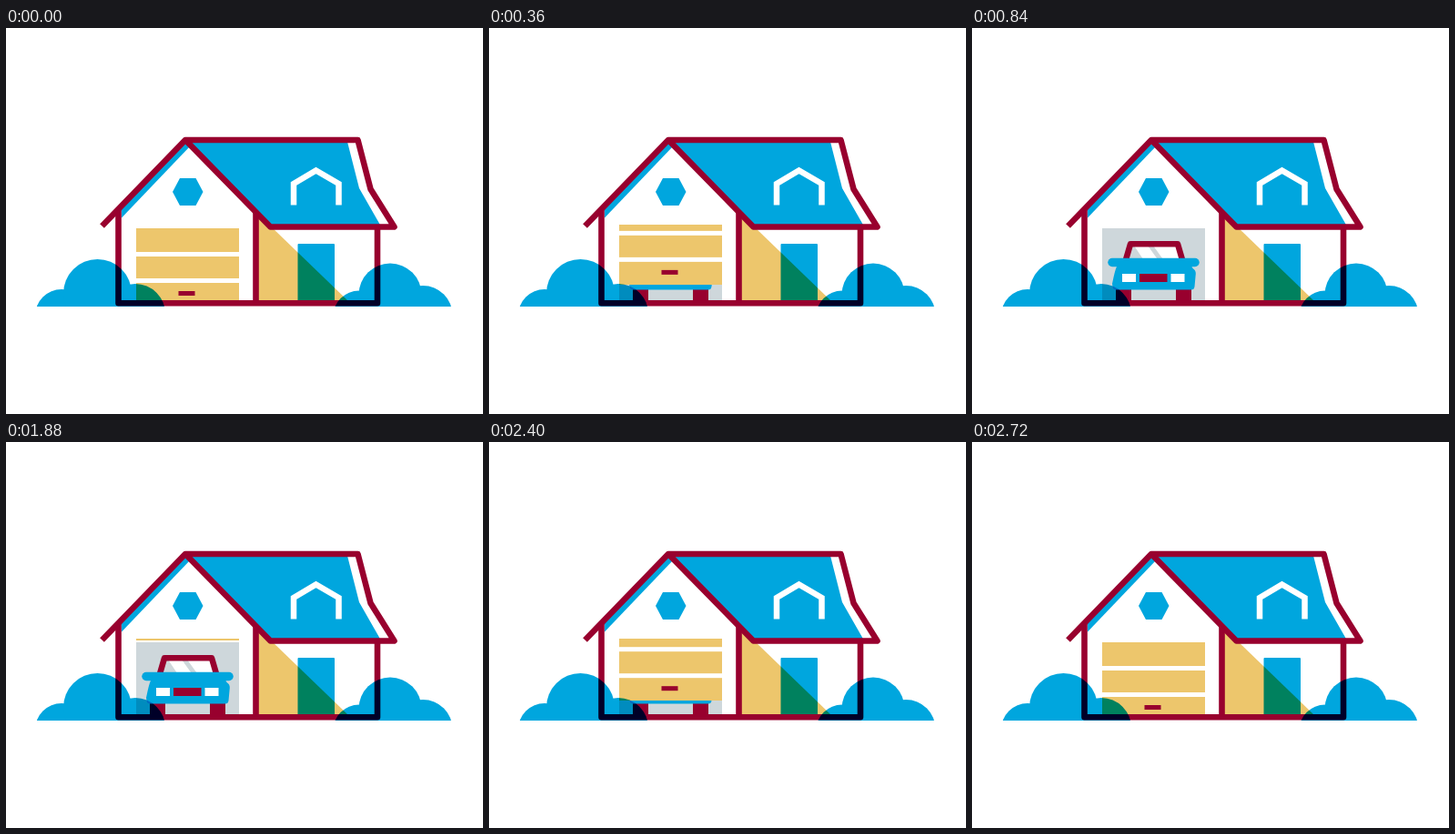
An HTML page that plays this animation: 524 px wide and 424 px high, repeating every 3.6 s.

```html
<!DOCTYPE html>
<html lang="en">
<head>
<meta charset="utf-8">
<title>Garage door</title>
<style>
  :root { --blue: #00a6de; --red: #98002e; --sand: #edc66c; --grey: #ced7db; }
  html, body { margin: 0; width: 100%; height: 100%; overflow: hidden; background: #fff; }
  svg { display: block; width: 524px; height: 424px; background: #fff; }
  .blue { fill: var(--blue); }
  .red { fill: var(--red); }
  .sand { fill: var(--sand); }
  .grey { fill: var(--grey); }
  .white { fill: #fff; }
  .line { fill: none; stroke: var(--red); stroke-width: 6.6; stroke-linejoin: round; }
  .mix { mix-blend-mode: multiply; }

  .door { animation: lift 3600ms infinite; }

  /* Speeds up, then runs evenly; closes the other way round. */
  @keyframes lift {
    0% { transform: translateY(0); animation-timing-function: cubic-bezier(.333, 0, .667, .333); }
    10.722% { transform: translateY(-26.5px); animation-timing-function: linear; }
    23.333%, 51.778% { transform: translateY(-89.1px); animation-timing-function: linear; }
    66.528% { transform: translateY(-21.6px); animation-timing-function: cubic-bezier(.333, .667, .667, 1); }
    75.972%, 100% { transform: translateY(0); }
  }
</style>
</head>
<body>
<svg viewBox="0 0 524 424" xmlns="http://www.w3.org/2000/svg">
  <defs>
    <clipPath id="opening"><rect x="143" y="216" width="113" height="84"/></clipPath>
    <clipPath id="ground"><rect width="524" height="305.5"/></clipPath>
  </defs>

  <!-- roof and front -->
  <path class="blue" d="M200 123H374.500L388 176L412 218H290Z"/>
  <path class="blue" d="M127 196L197 124L203 129L127 208.500Z"/>
  <path class="blue" d="M191 165H208.500L216.500 180L208.500 195H191L183 180Z"/>
  <path d="M316 194.500V171L340.500 156.500L365.500 171V194.500" fill="none" stroke="#fff" stroke-width="6.500"/>
  <path class="sand" d="M276 203.500L376 300H276Z"/>
  <rect class="blue mix" x="320.500" y="237" width="40.500" height="63" rx="1"/>

  <!-- garage and car -->
  <rect class="grey" x="143" y="220" width="113" height="80"/>
  <g>
    <path class="red" d="M158 285h17v15h-17zM224 285h17v15h-17z"/>
    <path class="grey" d="M174 237H226L232 257H168Z"/>
    <path class="white" d="M178 239H193L206 257H190ZM199 239H226L232 257H212Z"/>
    <path class="line" d="M168 258L174 237.300H226L232 258"/>
    <path d="M154 257.500H245" fill="none" stroke="var(--blue)" stroke-width="9.500" stroke-linecap="round"/>
    <path class="blue" d="M161 256H238L242.500 264Q246 266 245.800 270L244.500 284Q244 287.500 241 287.500H158Q155 287.500 154.500 284L154 281Q157 266 159 262Z"/>
    <path class="white" d="M165 270h15v9h-15zM218.500 270h15v9h-15z"/>
    <rect class="red" x="184" y="270" width="30.500" height="9"/>
  </g>
  <g clip-path="url(#opening)">
    <g class="door">
      <rect class="white" x="143" y="221" width="113" height="83"/>
      <path class="sand" d="M143 220h113v26h-113zM143 251h113v24h-113zM143 280h113v25h-113z"/>
      <rect class="red" x="189.500" y="289" width="18" height="5"/>
    </g>
  </g>

  <!-- outline -->
  <path class="line" d="M105.500 217.500L197 123H386.500L400.500 177L426.500 218.500H290.500L197 123"/>
  <path class="line" d="M123.500 200V302.300H408V219M274.500 203V302"/>

  <!-- bushes -->
  <g class="mix blue" clip-path="url(#ground)">
    <circle cx="61" cy="316" r="29"/>
    <circle cx="100.500" cy="291.500" r="37.500"/>
    <circle cx="142" cy="314" r="33"/>
    <circle cx="388" cy="317.500" r="29"/>
    <circle cx="422" cy="293" r="34.500"/>
    <circle cx="458" cy="315.500" r="32.500"/>
  </g>
</svg>
</body>
</html>
```
